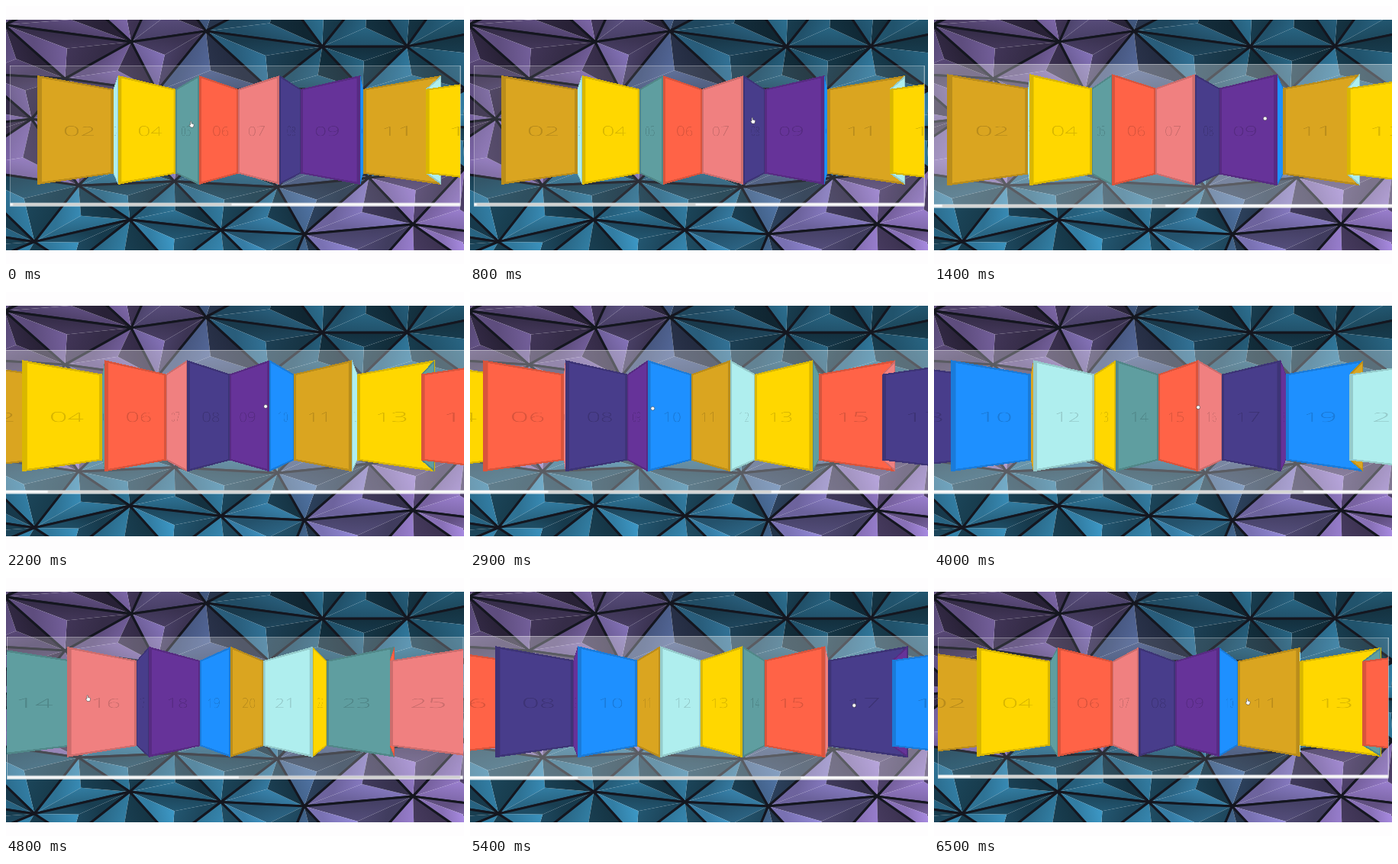
Write an HTML page with a canvas that moves like this. It is 600 px wide and 338 px high and loops after 6600 ms.

```html
<!DOCTYPE html>
<html lang="en">
<head>
<meta charset="utf-8">
<title>Drag to scroll</title>
<style>
  html, body { margin: 0; width: 100%; height: 100%; overflow: hidden; background: #fefdfe; }
  #stage { position: relative; width: 600px; height: 338px; overflow: hidden; }
  #wall { position: absolute; left: 0; top: 18px; }
  #items {
    position: absolute; left: -979.7px; top: -230.5px; width: 2560px; height: 800px;
    box-sizing: border-box; border: 2px solid #fff; overflow: hidden; perspective: 500px;
  }
  .item {
    position: absolute; top: 99px; width: 200px; height: 541px;
    display: flex; align-items: center; justify-content: center;
    font: 300 76px "Open Sans", "Noto Sans", sans-serif; color: rgba(0, 0, 0, .15);
    box-shadow: inset 0 0 0 10px rgba(0, 0, 0, .15);
  }
  .item:nth-child(even) { transform: scaleX(1.31) rotateY(40deg); }
  .item:nth-child(odd) { transform: scaleX(1.31) rotateY(-40deg); }
  #bar { position: absolute; left: 0; bottom: 0; width: 100%; height: 17px; background: #f8f8f8; }
  #thumb { position: absolute; top: 2px; width: 1241px; height: 13px; background: #d2d2d0; }
  #cursor { position: absolute; left: 0; top: 0; overflow: visible; }
  #cursor * { fill: #fff; stroke: #333; stroke-width: .5; }
</style>
</head>
<body>
<div id="stage">
  <canvas id="wall" width="600" height="302"></canvas>
  <div id="items"></div>
  <svg id="cursor" width="8" height="9">
    <circle id="fist" r="2.4"/>
    <path id="hand" d="M-1.5 -3.5q.8 -.8 1.5 0V-1L2.6 -.5Q3.4 0 3 1.5L2.3 4H-1L-3 1Q-3 0 -1.5 .7Z"/>
  </svg>
</div>
<script>
const $ = id => document.getElementById(id);
const clamp = (v, lo, hi) => Math.min(hi, Math.max(lo, v));
const mix = (a, b, u) => a + (b - a) * u;

// ---- Wall of shaded pyramids on a jittered triangular lattice ----
const PURPLE = [112, 92, 150], TEAL = [40, 100, 130];
const wall = $('wall').getContext('2d');

function noise(a, b) {
  const v = Math.sin(a * 127.1 + b * 311.7) * 43758.5453;
  return v - Math.floor(v);
}

const node = (row, col) => [
  20 + 130 * col + 65 * (row & 1) + 44 * (noise(row, col) - .5),
  36 + 64 * row + 36 * (noise(col, row + 50) - .5)
];

// Purple at the upper left and lower right, teal elsewhere, darker at the top
function toneAt([x, y]) {
  const side = y < 200 ? 270 - x : x - 420;
  const purple = 1 / (1 + Math.exp(-side / 25));
  const level = .8 + y / 1100 + .25 * (noise(x, y) - .5);
  return TEAL.map((v, i) => mix(v, PURPLE[i], purple) * level);
}

const shade = (rgb, k) => `rgb(${rgb.map(v => Math.round(clamp(v * k, 0, 255)))})`;

function trace(...pts) {
  wall.beginPath();
  pts.forEach(p => wall.lineTo(...p));
  wall.closePath();
}

function pyramid(...pts) {
  const apex = [0, 1].map(i => (pts[0][i] + pts[1][i] + pts[2][i]) / 3);
  const rgb = toneAt(apex);
  pts.forEach((p, i) => {
    const q = pts[(i + 1) % 3], mid = [mix(p[0], q[0], .5), mix(p[1], q[1], .5)];
    const angle = Math.atan2(mid[1] - apex[1], mid[0] - apex[0]);
    const light = .88 + .34 * Math.cos(angle - 2.6);
    const fill = wall.createLinearGradient(...apex, ...mid);
    fill.addColorStop(0, shade(rgb, light * 1.1));
    fill.addColorStop(1, shade(rgb, light * .9));
    trace(p, q, apex);
    wall.fillStyle = fill;
    wall.fill();
  });
  trace(...pts);
  wall.stroke();
}

wall.translate(0, -18);
wall.strokeStyle = '#14161f';
wall.lineWidth = 3;
wall.lineJoin = 'round';
for (let row = -2; row < 6; row++)
  for (let col = -2; col < 6; col++) {
    const odd = row & 1;
    pyramid(node(row, col), node(row, col + 1), node(row + 1, col + odd));
    pyramid(node(row, col + 1 - odd), node(row + 1, col), node(row + 1, col + 1));
  }

// ---- Panels ----
const colors = ['dodgerblue', 'goldenrod', 'paleturquoise', 'gold', 'cadetblue',
  'tomato', 'lightcoral', 'darkslateblue', 'rebeccapurple'];
const items = Array.from({ length: 25 }, (_, i) => {
  const el = document.createElement('div');
  el.className = 'item';
  el.textContent = String(i + 1).padStart(2, '0');
  el.style.background = colors[i % 9];
  $('items').append(el);
  return el;
});
$('items').insertAdjacentHTML('beforeend', '<div id="bar"><div id="thumb"></div></div>');

// ---- Motion ----
const LOOP = 6600, SCALE = .2355, MAX = 2642, GAIN = .972;
// Time, x, y of the pointer: at rest, then press and release in turn
const stops = [
  [0, 243, 155],
  [1180, 450, 147], [3000, 224, 153],
  [3280, 520, 147], [4750, 97, 157],
  [4950, 156, 160], [5450, 552, 168],
  [5900, 250, 165], [6300, 411, 162],
  [LOOP, 411, 162]
];

const ease = ms => Math.sin(clamp(ms / 200, 0, 1) * Math.PI / 2);

function pointer(t) {
  const n = stops.findIndex(s => s[0] > t);
  const [t0, x0, y0] = stops[n - 1], [t1, x1, y1] = stops[n];
  const u = ((t - t0) / (t1 - t0)) ** 1.246;
  return [mix(x0, x1, u), mix(y0, y1, u)];
}

function draw(t) {
  const [x, y] = pointer(t);
  let scroll = 0, active = 0, held = false;
  for (let i = 1; i < 8 && stops[i][0] <= t; i += 2) {
    const [press, from] = stops[i], [release, to] = stops[i + 1];
    held = t < release;
    scroll = clamp(scroll + (from - (held ? x : to)) * GAIN / SCALE, 0, MAX);
    active += ease(t - press) - ease(t - release);
  }
  $('items').style.transform = `scale(${SCALE * (.98 + .02 * active)})`;
  $('items').style.background = `rgba(255, 255, 255, ${.1 + .2 * active})`;
  items.forEach((el, i) => el.style.left = 99 + 200 * i - scroll + 'px');
  $('thumb').style.left = 17 + scroll / MAX * 1283 + 'px';

  $('cursor').style.transform = `translate(${x}px, ${y}px)`;
  $('fist').style.display = held ? '' : 'none';
  $('hand').style.display = held ? 'none' : '';
}

const start = performance.now();
function tick() {
  const t = (performance.now() - start) % LOOP;
  draw(Math.floor(t / 100) * 100);
  requestAnimationFrame(tick);
}
tick();
</script>
</body>
</html>
```
